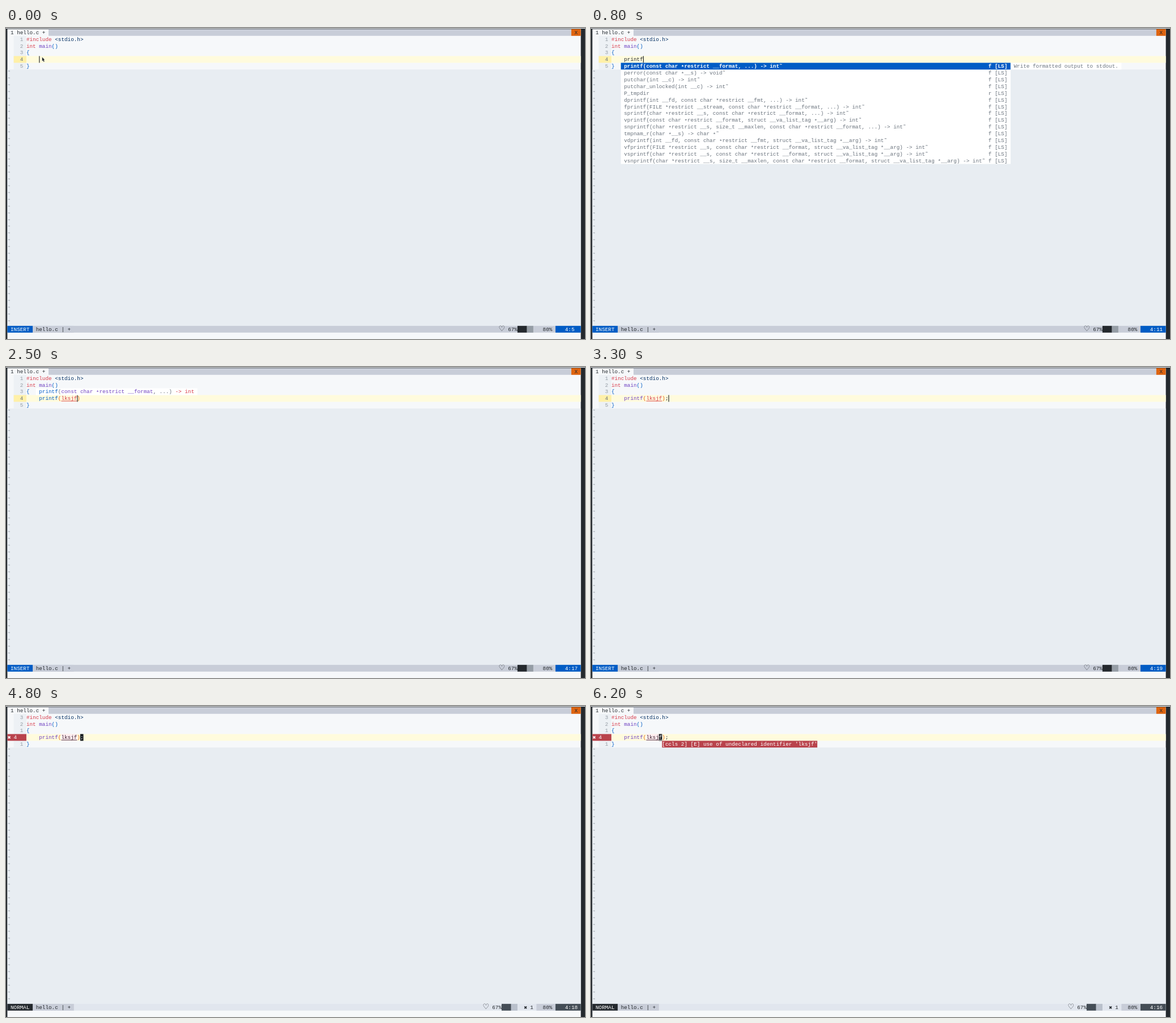
These frames come from a looping animation (1021 px wide and 548 px high, 6.6 s). An HTML page with a canvas:

```html
<!DOCTYPE html>
<html lang="en">
<head>
<meta charset="utf-8">
<title>Code completion in a terminal editor</title>
<style>
  html, body { margin: 0; width: 100%; height: 100%; overflow: hidden; background: #24292e; }
  canvas { display: block; width: 1021px; height: 548px; }
</style>
</head>
<body>
<canvas id="stage"></canvas>
<script>
const WIDTH = 1021, HEIGHT = 548, LOOP = 6600;
const LEFT = 2.4, TOP = 1.9, CELL = 5.587, LINE = 11.885, COLS = 181, ROWS = 46;
const MONO = '"Liberation Mono", monospace';
const SYMBOL = '"DejaVu Sans", sans-serif';

const C = {
  ink: '#24292e', paper: '#f6f8fa', popup: '#ffffff', empty: '#e8edf2', bar: '#c8cdd8',
  gutter: '#edf1f5', pale: '#e1e6ee', gray: '#6a737d', dim: '#959da5', red: '#d73a49',
  blue: '#005cc5', purple: '#6f42c1', navy: '#032f62', orange: '#e36209', error: '#b9434c',
  errorTint: '#ffeef0', errorInk: '#3f2233', slate: '#444d56',
  line: '#fffbdd', lineNumber: '#fff0a8', white: '#ffffff'
};

const MENU = `printf(const char *restrict __format, ...) -> int˜
perror(const char *__s) -> void˜
putchar(int __c) -> int˜
putchar_unlocked(int __c) -> int˜
P_tmpdir
dprintf(int __fd, const char *restrict __fmt, ...) -> int˜
fprintf(FILE *restrict __stream, const char *restrict __format, ...) -> int˜
sprintf(char *restrict __s, const char *restrict __format, ...) -> int˜
vprintf(const char *restrict __format, struct __va_list_tag *__arg) -> int˜
snprintf(char *restrict __s, size_t __maxlen, const char *restrict __format, ...) -> int˜
tmpnam_r(char *__s) -> char *˜
vdprintf(int __fd, const char *restrict __fmt, struct __va_list_tag *__arg) -> int˜
vfprintf(FILE *restrict __s, const char *restrict __format, struct __va_list_tag *__arg) -> int˜
vsprintf(char *restrict __s, const char *restrict __format, struct __va_list_tag *__arg) -> int˜
vsnprintf(char *restrict __s, size_t __maxlen, const char *restrict __format, struct __va_list_tag *__arg) -> int˜`.split('\n');
const DOC = 'Write formatted output to stdout.';

// Each step overrides the values left by the steps before it.
const STEPS = [
  [0, { mode: 'INSERT', word: '', column: 5, pointer: [63, 51], callColor: C.purple }],
  [300, { word: 'p', column: 6, pointer: null }],
  [400, { word: 'pr', column: 7 }],
  [500, { menu: 'open' }],
  [800, { word: 'printf', column: 11, menu: 'selected' }],
  [1500, { menu: null, argument: '', column: 12, signature: 'full' }],
  [1700, { signature: 'short', callColor: C.blue }],
  [2300, { argument: 'lk', column: 14, callColor: C.purple }],
  [2400, { argument: 'lksj', column: 16 }],
  [2500, { argument: 'lksjf', column: 17, callColor: C.blue }],
  [3100, { signature: null, column: 18, callColor: C.purple }],
  [3300, { tail: ';', column: 19 }],
  [3800, { mode: 'NORMAL', column: 18, errors: 2, pointer: [0, 51],
           message: "[ccls 4] [E] expected ';' after expression" }],
  [4100, { pointer: [0, 41] }],
  [4300, { pointer: [14, 16] }],
  [4500, { pointer: null }],
  [4800, { message: null, errors: 1 }],
  [5700, { column: 17, match: true }],
  [6000, { column: 16, match: false }],
  [6200, { message: "[ccls 2] [E] use of undeclared identifier 'lksjf'" }]
];

const canvas = document.getElementById('stage');
const ratio = window.devicePixelRatio || 1;
canvas.width = Math.round(WIDTH * ratio);
canvas.height = Math.round(HEIGHT * ratio);
const g = canvas.getContext('2d');
g.scale(ratio, ratio);

const colX = col => LEFT + col * CELL;
const rowY = row => TOP + row * LINE;

function fill(color, col, row, cols, rows = 1) {
  g.fillStyle = color;
  g.fillRect(colX(col), rowY(row), cols * CELL, rows * LINE);
}

function put(col, row, text, color, { bold = false, underline = false } = {}) {
  g.font = `${bold ? 'bold ' : ''}9.31px ${MONO}`;
  g.fillStyle = color;
  [...text].forEach((char, i) => {
    const drop = char === '*' ? 1.6 : 0; // asterisks sit at mid height
    if (char !== ' ') g.fillText(char, colX(col + i), rowY(row) + 8.9 + drop);
  });
  if (underline) g.fillRect(colX(col), rowY(row) + 10.1, text.length * CELL, 0.9);
}

function runs(col, row, parts) {
  for (const [text, color, style] of parts) {
    put(col, row, text, color, style);
    col += text.length;
  }
}

function symbol(char, col, row, color, size) {
  g.font = `${size}px ${SYMBOL}`;
  g.fillStyle = color;
  g.fillText(char, colX(col), rowY(row) + 9);
}

function drawFrame() {
  g.fillStyle = C.ink;
  g.fillRect(0, 0, WIDTH, HEIGHT);
  g.fillStyle = C.paper;
  g.fillRect(0, 0, WIDTH, 1);
  fill(C.paper, 0, 0, COLS, ROWS);
  fill(C.bar, 13, 0, COLS - 13);
  put(1, 0, '1 hello.c +', C.ink);
  fill('#df640f', 178, 0, 3);
  put(179, 0, 'X', C.ink);
  fill(C.empty, 0, 6, COLS, 38);
  for (let row = 6; row < 44; row++) put(0, row, '˜', C.dim);
}

function drawGutter(s) {
  const normal = s.mode === 'NORMAL';
  fill(C.gutter, 2, 1, 4, 5);
  fill(C.line, 6, 4, COLS - 6);
  for (let row = 1; row <= 5; row++) {
    if (row !== 4) put(4, row, String(normal ? Math.abs(row - 4) : row), C.dim);
  }
  if (normal) {
    fill(C.error, 0, 4, 6);
    symbol('✖', 0, 4, C.white, 7.5);
    put(2, 4, '4', C.white);
  } else {
    fill(C.lineNumber, 2, 4, 4);
    put(4, 4, '4', C.gray);
  }
}

function drawCode(s) {
  const normal = s.mode === 'NORMAL';
  runs(6, 1, [['#include ', C.red], ['<stdio.h>', C.navy]]);
  runs(6, 2, [['int ', C.red], ['main', C.purple], ['()', C.blue]]);
  put(6, 3, '{', C.blue);
  put(6, 5, '}', C.blue);

  if (s.argument === undefined) {
    put(10, 4, s.word, C.ink);
  } else {
    const paren = { bold: Boolean(s.match) };
    if (normal) fill(C.errorTint, 17, 4, s.argument.length);
    runs(10, 4, [
      ['printf', s.callColor],
      ['(', C.orange, paren],
      [s.argument, normal ? C.errorInk : C.red, { underline: true }],
      [')', C.orange, paren],
      [s.tail || '', C.ink]
    ]);
  }

  const col = s.column + 5;
  if (normal) {
    const char = `printf(${s.argument})${s.tail}`[col - 10];
    fill('#14181c', col, 4, 1);
    put(col, 4, char, C.white, { underline: char === 'f' });
  } else {
    g.fillStyle = C.ink;
    g.fillRect(colX(col), rowY(4), 1.2, LINE);
  }
}

function drawMenu(selected) {
  fill(C.popup, 9, 5, 123, MENU.length);
  MENU.forEach((item, i) => {
    const row = 5 + i, active = selected && i === 0;
    const color = active ? C.white : C.gray;
    if (active) fill(C.blue, 9, row, 123);
    put(10, row, item, color, { bold: active });
    put(125, row, `${item === 'P_tmpdir' ? 'r' : 'f'} [LS]`, color, { bold: active });
  });
  if (selected) {
    fill(C.popup, 132, 5, 35);
    put(133, 5, DOC, C.gray);
  }
}

function drawSignature(kind) {
  if (kind === 'full') {
    const underline = true;
    fill(C.popup, 9, 1, 51, 3);
    runs(10, 1, [
      ['printf(', C.gray], ['const char *restrict', C.red, { underline }],
      [' __format', C.gray, { underline }], [', ...) -> ', C.gray], ['int', C.red]
    ]);
    put(10, 2, '-'.repeat(49), C.gray);
    put(10, 3, DOC, C.gray);
  } else {
    fill(C.popup, 9, 3, 51);
    runs(10, 3, [
      ['printf', C.blue], ['(', C.gray], ['const char *restrict __format', C.purple],
      [', ...) ', C.gray], ['-> int', C.red]
    ]);
  }
}

function drawStatus(s) {
  const normal = s.mode === 'NORMAL', row = 44;
  const accent = normal ? C.slate : C.blue;
  const battery = normal ? 150 : 155;
  fill(normal ? C.pale : C.bar, 0, row, COLS);
  fill(C.bar, 8, row, 13);
  fill(normal ? C.ink : C.blue, 0, row, 8);
  put(1, row, s.mode, C.white);
  put(9, row, 'hello.c | +', C.ink);

  symbol('♡', battery, row, C.ink, 13);
  put(battery + 3, row, '67%', C.ink);
  fill(normal ? C.slate : C.ink, battery + 6, row, 3);
  fill(normal ? '#b9c0cb' : C.dim, battery + 9, row, 2);

  if (normal) {
    symbol('✖', 163, row, C.ink, 7.5);
    put(165, row, String(s.errors), C.ink);
    fill(C.bar, 167, row, 6);
  }
  put(169, row, '80%', C.ink);
  fill(accent, 173, row, 8);
  put(176, row, `4:${s.column}`, C.white);
}

function drawPointer([x, y]) {
  g.save();
  g.translate(x, y);
  g.beginPath();
  g.moveTo(0.8, 0.5);
  g.lineTo(5, 5);
  g.lineTo(3.5, 5.4);
  g.lineTo(4.7, 7.9);
  g.lineTo(3.4, 8.4);
  g.lineTo(2.4, 6);
  g.lineTo(0.8, 7);
  g.closePath();
  g.lineWidth = 0.9;
  g.strokeStyle = '#e4e4e0';
  g.stroke();
  g.fillStyle = C.ink;
  g.fill();
  g.restore();
}

function draw(s) {
  drawFrame();
  drawGutter(s);
  drawCode(s);
  if (s.menu) drawMenu(s.menu === 'selected');
  if (s.signature) drawSignature(s.signature);
  if (s.message) {
    const col = s.column + 6;
    fill(C.error, col, 5, s.message.length);
    put(col, 5, s.message, C.white);
  }
  drawStatus(s);
  if (s.pointer) drawPointer(s.pointer);
}

let start, shown;
function tick(now) {
  start ??= now;
  const time = (now - start) % LOOP;
  const past = STEPS.filter(([at]) => at <= time);
  if (past.length !== shown) {
    shown = past.length;
    draw(Object.assign({}, ...past.map(([, change]) => change)));
  }
  requestAnimationFrame(tick);
}
requestAnimationFrame(tick);
</script>
</body>
</html>
```
